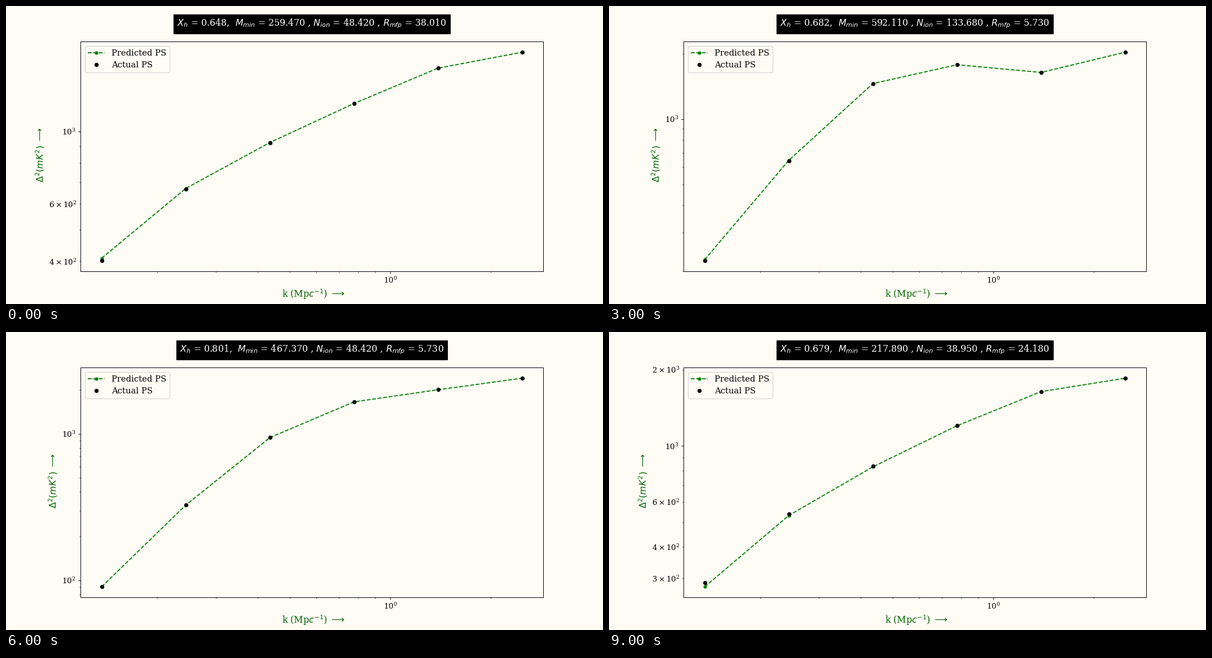
A matplotlib script that plays this animation: 1058 px wide and 529 px high, repeating every 10 s.

```python
from collections import namedtuple

import matplotlib.pyplot as plt
import numpy as np
from matplotlib.animation import FuncAnimation

CREAM = "#fffcf5"
plt.rcParams.update({
    "font.family": "DejaVu Serif",
    "figure.facecolor": CREAM,
    "axes.facecolor": CREAM,
    "savefig.facecolor": CREAM,
    "xtick.labelsize": 11,
    "ytick.labelsize": 11,
})

T = np.linspace(0, 1, 6)
K = 0.136 * 10 ** (1.2626 * T)

# x_h: neutral fraction; m, n, r: steps on the parameter grids;
# low: log power at the smallest k, relative to 10^3; bend: bulge of the curve;
# miss: log error of the prediction at the smallest k
Case = namedtuple("Case", "x_h m n r low bend miss")
CASES = [
    Case(0.648, 6, 3, 16, -0.396, 0.184, 0.008),
    Case(0.823, 14, 3, 8, -0.843, 0.269, 0.002),
    Case(0.835, 10, 1, 10, -0.977, 0.245, 0.002),
    Case(0.682, 14, 12, 2, -0.652, 0.390, 0.005),
    Case(0.809, 7, 1, 11, -1.056, 0.242, 0.015),
    Case(0.778, 12, 4, 2, -0.946, 0.320, 0),
    Case(0.801, 11, 3, 2, -1.044, 0.308, 0),
    Case(0.696, 11, 5, 13, -0.400, 0.233, 0),
    Case(0.713, 13, 5, 3, -0.456, 0.300, 0),
    Case(0.679, 5, 2, 10, -0.540, 0.192, -0.016),
]

TITLE = (r"$X_h$ = {:.3f},  $M_{{min}}$ = {:.3f} , "
         r"$N_{{ion}}$ = {:.3f} , $R_{{mfp}}$ = {:.3f}")


def grid_values(case):
    """M_min, N_ion and R_mfp on their evenly spaced grids."""
    m_min = 10 + 790 / 19 * case.m
    n_ion = 20 + 180 / 19 * case.n
    r_mfp = 1.118 + 2.306 * case.r
    return [round(v, 2) for v in (m_min, n_ion, r_mfp)]


def spectra(case):
    """Actual and predicted power: a log-log rise with three sine harmonics."""
    m_min, n_ion, _ = grid_values(case)
    high = 0.24 + 0.9 * (case.x_h - 0.648) + 0.0004 * (n_ion - 40)
    skew = 7e-5 * m_min + 7e-4 * n_ion - 0.042
    ripple = 0.085 - 0.32 * case.bend
    rise = T + sum(a * np.sin((j + 1) * np.pi * T)
                   for j, a in enumerate((case.bend, skew, ripple)))
    log_power = 3 + case.low + (high - case.low) * rise
    error = case.miss * 0.35 ** np.arange(len(T))
    return 10 ** log_power, 10 ** (log_power + error)


fig, ax = plt.subplots(figsize=(12, 6), dpi=88.1667)
ax.set_xscale("log")
ax.set_yscale("log")
predicted, = ax.plot(K, K, "--o", color="green", lw=1.5, ms=4,
                     label="Predicted PS")
actual, = ax.plot(K, K, "o", color="black", ms=5, label="Actual PS")
label_style = dict(fontsize=13, color="darkgreen")
ax.set_xlabel(r" k (Mp$c^{-1}$) $\longrightarrow$", **label_style)
ax.set_ylabel(r" $\Delta^2 (mK^2)$ $\longrightarrow$", **label_style)
ax.legend(loc="upper left", fontsize=12)
title = ax.set_title("", fontsize=13, color="white", y=1.05,
                     bbox=dict(facecolor="black", pad=5))


def draw(i):
    case = CASES[i]
    power, guess = spectra(case)
    actual.set_ydata(power)
    predicted.set_ydata(guess)
    ax.relim()
    ax.autoscale_view()
    title.set_text(TITLE.format(case.x_h, *grid_values(case)))
    return predicted, actual, title


anim = FuncAnimation(fig, draw, frames=len(CASES), interval=1000,
                     repeat=True, repeat_delay=0, blit=False)
plt.show()
```
